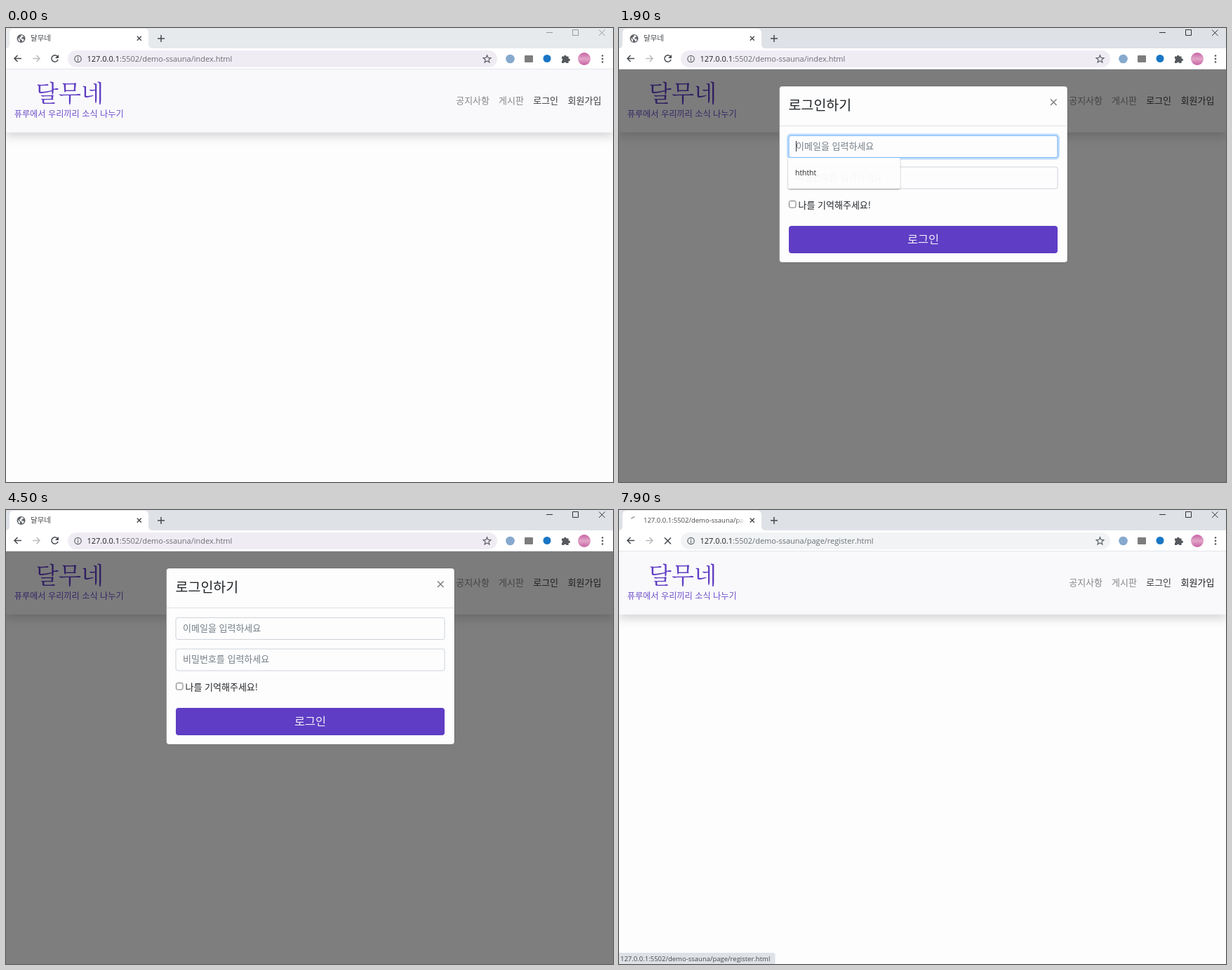
Animation, 865 px wide and 647 px high, one loop 8000 ms. Source, as an HTML page:

```html
<!DOCTYPE html>
<html lang="ko">
<head>
<meta charset="utf-8">
<title>달무네</title>
<style>
  html, body { margin: 0; width: 100%; height: 100%; overflow: hidden; background: #fdfdfd; }
  svg { display: block; width: 100vw; height: 100vh; }
  text { font: 300 13px "Noto Sans CJK KR", "Noto Sans CJK", sans-serif; white-space: pre; }
  .ui { font: 400 11px "Open Sans", "Noto Sans", sans-serif; }
  .small { font-size: 9.5px; }
  .brand { fill: #5f3dc4; }
  .logo { font: 300 33.4px "Noto Serif CJK KR", "Noto Serif", "Noto Sans CJK KR", serif; }
  .hint { fill: #747d85; }
  .line { fill: none; stroke: #5f6368; stroke-width: 1.5; }
  .dark { stroke: #45494d; }
  .field { fill: #fdfdfd; stroke: #ced4da; }
  .focus { fill: none; stroke: #80bdff; }
  .glow { fill: none; stroke: #007bff; stroke-opacity: .25; stroke-width: 2.6; }
  .caret { stroke: #333; }
</style>
</head>
<body>
<svg viewBox="0 0 865 647">
  <defs>
    <filter id="headShadow" x="-5%" y="-10%" width="110%" height="150%">
      <feDropShadow dx="0" dy="6.5" stdDeviation="6.5" flood-opacity=".15"/>
    </filter>
    <filter id="listShadow" x="-10%" y="-20%" width="120%" height="150%">
      <feDropShadow dx="0" dy="1" stdDeviation="1.3" flood-opacity=".4"/>
    </filter>
    <linearGradient id="fade"><stop stop-color="#fff" stop-opacity="0"/><stop offset="1" stop-color="#fff"/></linearGradient>
    <linearGradient id="avatar" x2="0" y2="1"><stop stop-color="#c763a4"/><stop offset=".5" stop-color="#e2a6c8"/><stop offset="1" stop-color="#c763a4"/></linearGradient>
  </defs>

  <!-- page -->
  <rect width="865" height="647" fill="#fdfdfd"/>
  <rect y="59" width="865" height="89.5" fill="#f9f9fc" filter="url(#headShadow)"/>
  <text class="brand logo" x="42.5" y="105">달무네</text>
  <text class="brand" x="11.7" y="127.3" style="font-size:12.2px" fill-opacity=".9">퓨루에서 우리끼리 소식 나누기</text>
  <text id="notice" x="641.2" y="108" fill-opacity=".46">공지사항</text>
  <text x="702" y="108" fill-opacity=".46">게시판</text>
  <text x="751.2" y="108" fill-opacity=".76">로그인</text>
  <text id="join" x="800.5" y="108" fill-opacity=".76">회원가입</text>

  <!-- login dialog -->
  <rect id="backdrop" y="59" width="865" height="588" opacity="0"/>
  <g id="modal" opacity="0">
    <rect x="228.5" y="83" width="410.5" height="251" rx="4" fill="#fdfdfd" stroke="#000" stroke-opacity=".2"/>
    <path d="M229 139.5H638.5" stroke="#dee2e6"/>
    <text x="241.5" y="117" fill="#212529" style="font-size:19.5px">로그인하기</text>
    <path id="close" d="M615 101.5L623.5 110M623.5 101.5L615 110" stroke="#000" stroke-width="1.5" stroke-opacity=".5"/>

    <rect class="field" x="242" y="153.5" width="383" height="31" rx="3"/>
    <g id="focusMail" opacity="0">
      <rect class="glow" x="240.4" y="151.9" width="386.2" height="34.2" rx="4"/>
      <rect class="focus" x="242" y="153.5" width="383" height="31" rx="3"/>
    </g>
    <text class="hint" x="252" y="173">이메일을 입력하세요</text>
    <path id="caretMail" class="caret" d="M252.5 161V176" opacity="0"/>

    <rect class="field" x="242" y="198" width="383" height="31" rx="3"/>
    <g id="focusPass" opacity="0">
      <rect class="glow" x="240.4" y="196.4" width="386.2" height="34.2" rx="4"/>
      <rect class="focus" x="242" y="198" width="383" height="31" rx="3"/>
    </g>
    <text class="hint" x="252" y="217.3">비밀번호를 입력하세요</text>
    <path id="caretPass" class="caret" d="M252.5 206V221" opacity="0"/>

    <g id="list" opacity="0">
      <rect x="241" y="185" width="159.5" height="44" rx="2" fill="#fdfdfd" filter="url(#listShadow)"/>
      <text class="ui" x="251" y="210" fill="#222" style="font-size:10.4px">hththt</text>
    </g>

    <rect id="box" x="242.5" y="246.5" width="9.5" height="9.5" rx="2" fill="#fff" stroke="#767676"/>
    <path id="tick" d="M244.5 251.5l2 2.2 3.8-5" fill="none" stroke="#fff" stroke-width="1.6" opacity="0"/>
    <text x="255.5" y="256.5" fill="#212529">나를 기억해주세요!</text>

    <rect x="242" y="282" width="383" height="39" rx="4" fill="#5f3dc4"/>
    <text id="submit" x="433.5" y="307" text-anchor="middle" fill="#f1eefa" style="font-size:16.4px">로그인</text>
  </g>

  <!-- tab strip -->
  <rect id="strip" width="865" height="30" fill="#e7eaed"/>
  <path d="M-1 29Q5 29 5 23V7Q5 1 11 1H197Q203 1 203 7V23Q203 29 209 29Z" fill="#fff"/>
  <g id="homeTab">
    <circle cx="21.5" cy="15" r="6" fill="#5f6368"/>
    <path d="M17 14l3 2.5v3l-2-1zM21 10.5h3l1 2-2.5 1-.5 2h3l.5 2-2 2-1-2.5-2.5-1.5-1-2 2-1z" fill="#fff"/>
    <text x="35" y="18.3" fill="#45494d" style="font-size:10.5px">달무네</text>
  </g>
  <g id="loadTab" opacity="0">
    <path id="spin" d="M17.5 12.5Q19.5 9.7 22.5 9.8" fill="none" stroke="#80868b" stroke-width="1.3"/>
    <text class="ui small" x="35" y="18.3" fill="#45494d">127.0.0.1:5502/demo-ssauna/pa</text>
    <rect x="167" y="6" width="12" height="18" fill="url(#fade)"/>
    <rect x="179" y="6" width="20" height="18" fill="#fff"/>
  </g>
  <path class="line dark" d="M186.8 11.8l6 6M192.8 11.8l-6 6"/>
  <path class="line dark" d="M216 15h10M221 10v10"/>
  <path id="winButtons" d="M770 6.5h9M807.5 2.5h8v8h-8zM845 2.5l8.5 8.5M853.5 2.5l-8.5 8.5" fill="none" stroke="#999"/>

  <!-- toolbar -->
  <rect y="29" width="865" height="30" fill="#fff"/>
  <path d="M0 58.5H865" stroke="#e3e5e9"/>
  <path class="line dark" d="M22 43.5H12.5M16.5 39l-4.5 4.5 4.5 4.5"/>
  <path class="line" d="M38 43.5h9.5M43.5 39l4.5 4.5-4.5 4.5" style="stroke:#babcbe"/>
  <g id="reload">
    <path class="line dark" d="M73 40.2A4.7 4.7 0 1 0 74.1 45"/>
    <path d="M75 38v5h-5z" fill="#45494d"/>
  </g>
  <path id="stop" class="line dark" d="M65 39.5l9 9M74 39.5l-9 9" opacity="0"/>
  <rect id="pill" x="88" y="32" width="612" height="24" rx="12" fill="#f0ecf4"/>
  <circle class="line" cx="102.5" cy="44" r="4.7" style="stroke-width:1.2"/>
  <path d="M102.5 43.3v3.4M102.5 41v1.3" stroke="#5f6368" stroke-width="1.2"/>
  <text id="homeUrl" class="ui" x="115.5" y="48" fill="#6b6f74"><tspan fill="#202124">127.0.0.1</tspan>:5502/demo-ssauna/index.html</text>
  <text id="nextUrl" class="ui" x="115.5" y="48" fill="#6b6f74" opacity="0"><tspan fill="#202124">127.0.0.1</tspan>:5502/demo-ssauna/page/register.html</text>
  <path class="line" d="M685.5 38.8l1.5 3.6 3.9.3-3 2.5 1 3.8-3.4-2-3.4 2 1-3.8-3-2.5 3.9-.3z" style="stroke-width:1.2"/>
  <circle cx="718.5" cy="44" r="6.3" fill="#86a9cd"/>
  <rect x="739" y="39" width="12" height="10" rx="1" fill="#7d7d7d"/>
  <circle cx="771" cy="43.5" r="5.5" fill="#1976c5"/>
  <path d="M792 40.5h3a1.8 1.8 0 1 1 3.6 0h3v3.2a1.8 1.8 0 1 1 0 3.4v2.9h-3.2a1.8 1.8 0 0 0-3.4 0h-3v-3.2a1.8 1.8 0 0 0 0-3.4z" fill="#55595d"/>
  <circle cx="824" cy="44" r="9" fill="url(#avatar)"/>
  <g fill="#55595d"><circle cx="850" cy="39.5" r="1.3"/><circle cx="850" cy="44" r="1.3"/><circle cx="850" cy="48.5" r="1.3"/></g>

  <!-- link preview -->
  <g id="status" opacity="0">
    <path d="M0 631H219.5Q222.5 631 222.5 634V647H0Z" fill="#dee1e6"/>
    <text class="ui small" x="2" y="643" fill="#45494d">127.0.0.1:5502/demo-ssauna/page/register.html</text>
  </g>
</svg>
<script>
  const LOOP = 8000;

  // id, property, [time in ms, value] ...; every value holds until the next one
  const tracks = [
    ['strip', 'fill', [0, '#e7eaed'], [500, '#dee1e6']],
    ['winButtons', 'stroke', [0, '#999'], [500, '#333']],
    ['pill', 'fill', [0, '#f0ecf4'], [5700, '#f1f3f4']],

    ['backdrop', 'opacity', [0, 0], [500, .25], [600, .5], [6500, 0]],
    ['modal', 'opacity', [0, 0], [500, .5], [600, 1], [6500, 0]],
    ['modal', 'transform', [0, 'translateY(-15px)'], [600, 'translateY(0px)']],
    ['close', 'strokeOpacity', [0, .5], [6100, .78]],

    ['focusMail', 'opacity', [0, 0], [1900, 1], [2700, .5], [2800, 0]],
    ['caretMail', 'opacity', [0, 0], [1900, 1], [2300, 0]],
    ['list', 'opacity', [0, 0], [1900, .95], [2000, 1], [2700, 0]],
    ['focusPass', 'opacity', [0, 0], [2700, .5], [2800, 1], [3700, .6], [3800, .2], [3900, 0]],
    ['caretPass', 'opacity', [0, 0], [2700, 1], [3200, 0]],

    ['box', 'stroke', [0, '#767676'], [3500, '#4f4f4f'], [3700, '#0075ff'], [4300, '#4f4f4f'], [4500, '#767676']],
    ['box', 'fill', [0, '#fff'], [3700, '#0075ff'], [4300, '#fff']],
    ['tick', 'opacity', [0, 0], [3700, 1], [4300, 0]],
    ['submit', 'fill', [0, '#f1eefa'], [3100, '#fff'], [3300, '#f1eefa'], [5300, '#fff'], [5700, '#f1eefa']],

    ['notice', 'fillOpacity', [0, .46], [6700, .66], [6800, .46]],
    ['join', 'fillOpacity', [0, .76], [7000, .9]],
    ['status', 'opacity', [0, 0], [7200, .6], [7300, 1]],
    ['spin', 'opacity', [0, 0], [7800, .6], [7900, 1]],
    ...['homeTab', 'homeUrl', 'reload'].map(id => [id, 'opacity', [0, 1], [7800, 0]]),
    ...['loadTab', 'nextUrl', 'stop'].map(id => [id, 'opacity', [0, 0], [7800, 1]]),
  ];

  for (const [id, property, ...steps] of tracks) {
    const held = [...steps, [LOOP, steps.at(-1)[1]]];
    const frames = held.map(([time, value]) => ({ offset: time / LOOP, [property]: value, easing: 'step-end' }));
    document.getElementById(id).animate(frames, { duration: LOOP, iterations: Infinity });
  }
</script>
</body>
</html>
```
